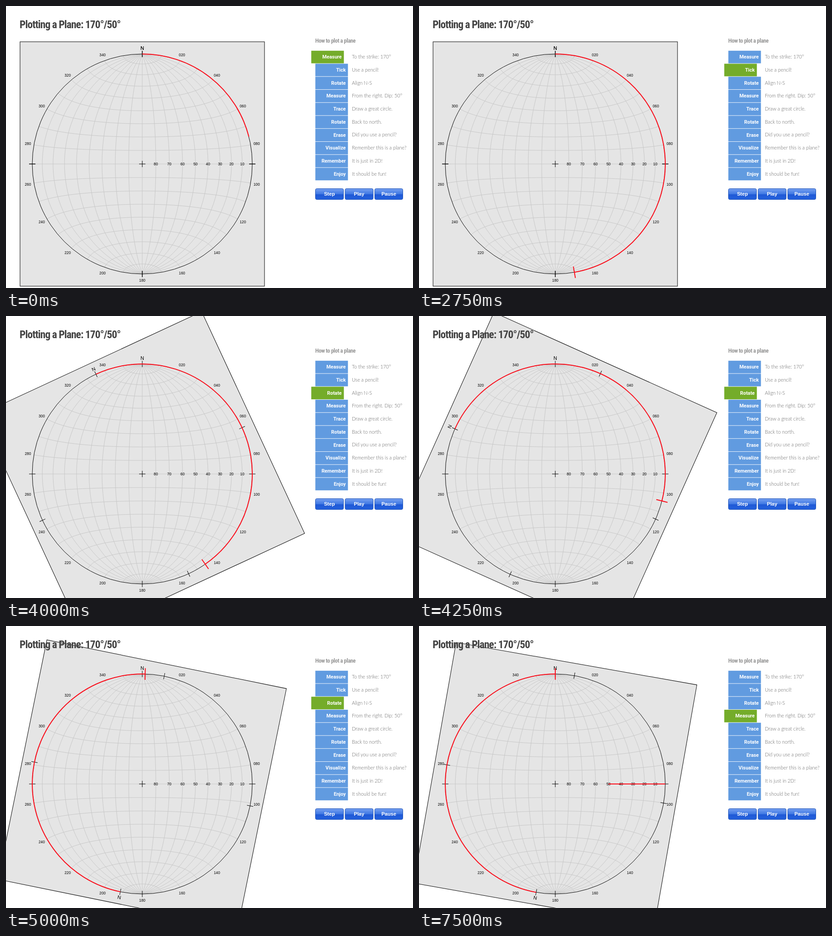
These frames come from a looping animation (899 px wide and 623 px high, 8000 ms). An HTML page:

```html
<!DOCTYPE html>
<html lang="en">
<head>
<meta charset="utf-8">
<title>Plotting a Plane</title>
<style>
  html, body { margin: 0; width: 100%; height: 100%; overflow: hidden; background: #fff; }
  svg { display: block; width: 899px; height: 623px; }
  .paper { fill: #e5e5e5; stroke: #000; }
  .grid { fill: none; stroke: #c8c8c8; }
  .line { fill: none; stroke: #000; }
  .red { fill: none; stroke: #fc0d1b; stroke-width: 2; }
  .degree { font: 8.3px "Liberation Sans", Arial, sans-serif; text-anchor: middle; }
  .north { font: 11px "Liberation Sans", Arial, sans-serif; text-anchor: middle; }
  .narrow { font-family: "Roboto Condensed", "Liberation Sans Narrow", "Open Sans Condensed", Roboto, sans-serif;
    font-stretch: 75%; font-weight: 700; letter-spacing: -.04em; }
  .label { font: 700 10.9px Roboto, sans-serif; fill: #fff; text-anchor: end; }
  .hint { font: 300 10.85px Lato, sans-serif; fill: #5e5e5e; }
  .button { fill: url(#gloss); stroke: #1c50b4; }
  .caption { font: 700 11.1px "Liberation Sans", Arial, sans-serif; fill: #fff; text-anchor: middle; }
</style>
</head>
<body>
<svg viewBox="0 0 899 623" xmlns="http://www.w3.org/2000/svg">
  <defs>
    <linearGradient id="gloss" x2="0" y2="1">
      <stop offset="0" stop-color="#759ff0"/>
      <stop offset=".5" stop-color="#3f78e3"/>
      <stop offset=".5" stop-color="#1f59d6"/>
      <stop offset="1" stop-color="#2460dc"/>
    </linearGradient>
  </defs>
</svg>
<script>
const STEP = 250, LOOP = 8000;
const CX = 301, CY = 349, SIDE = 540, R = SIDE * .45;
const MARK_OUT = R + 12.8, MARK_IN = R - 12.8;
const BLUE = [97, 155, 224], GREEN = [116, 172, 42];
const STEPS = [
  ['Measure', 'To the strike: 170°'],
  ['Tick', 'Use a pencil!'],
  ['Rotate', 'Align N-S'],
  ['Measure', 'From the right. Dip: 50°'],
  ['Trace', 'Draw a great circle.'],
  ['Rotate', 'Back to north.'],
  ['Erase', 'Did you use a pencil?'],
  ['Visualize', 'Remember this is a plane?'],
  ['Remember', 'It is just in 2D!'],
  ['Enjoy', 'It should be fun!']
];

const svg = document.querySelector('svg');
const rad = deg => deg * Math.PI / 180;
const range = (from, to, by) =>
  Array.from({ length: Math.floor((to - from) / by) + 1 }, (_, i) => from + i * by);

function add(parent, tag, attrs = {}, text = '') {
  const el = document.createElementNS(svg.namespaceURI, tag);
  for (const key in attrs) el.setAttribute(key, attrs[key]);
  el.textContent = text;
  return parent.appendChild(el);
}

// Point on the rim of a circle, bearing clockwise from north.
const bearing = (deg, r) => [r * Math.sin(rad(deg)), -r * Math.cos(rad(deg))];

// Lower-hemisphere equal-area projection, pole pointing north.
function project(theta, dip) {
  const t = rad(theta), d = rad(dip);
  const k = R / Math.sqrt(1 + Math.sin(t) * Math.sin(d));
  return [k * Math.sin(t) * Math.cos(d), -k * Math.cos(t)];
}

const trace = points => 'M' + points.map(p => p.map(v => v.toFixed(2)).join()).join('L');

function addTicks(parent) {
  for (const deg of [0, 90, 180, 270])
    add(parent, 'path', { class: 'line', d: trace([bearing(deg, R - 7), bearing(deg, R + 7)]) });
  add(parent, 'text', { class: 'north', y: -251.7 }, 'N');
}

const plot = add(svg, 'g', { transform: `translate(${CX} ${CY})` });
const paper = add(plot, 'rect', { class: 'paper', x: -SIDE / 2, y: -SIDE / 2, width: SIDE, height: SIDE });

function drawNet() {
  const fine = range(0, 180, 4);
  const curves = range(10, 170, 10).flatMap(a => [
    fine.map(t => project(t, a)),
    fine.map(d => project(a, d))
  ]);
  add(plot, 'path', { class: 'grid', d: curves.map(trace).join('') });
  add(plot, 'circle', { class: 'line', r: R });
  add(plot, 'path', { class: 'line', d: 'M-7 0H7M0-7V7' });
  addTicks(plot);
  for (const deg of range(20, 340, 20)) {
    const [x, y] = bearing(deg, 256.5);
    add(plot, 'text', { class: 'degree', x, y: y + 3 }, String(deg).padStart(3, '0'));
  }
  for (const dip of range(10, 80, 10))
    add(plot, 'text', { class: 'degree', x: project(90, dip)[0], y: 3 }, dip);
}
drawNet();

const overlay = add(plot, 'g');
addTicks(overlay);
const arc = add(overlay, 'path', { class: 'red' });
const mark = add(overlay, 'path', { class: 'red' });
const dipLine = add(plot, 'path', { class: 'red' });

// Sets a heading at the largest even size that keeps it on its line.
function heading(x, y, size, fill, room, text) {
  const el = add(svg, 'text', { class: 'narrow', x, y, fill, 'font-size': size }, text);
  const scale = Math.min(1, room / el.getComputedTextLength());
  el.setAttribute('font-size', size * scale);
}
heading(30, 49, 25, '#444', 223, 'Plotting a Plane: 170°/50°');
heading(683, 80.5, 14, '#999', 89, 'How to plot a plane');

const tabs = STEPS.map(([name, hint], i) => {
  const y = 98.8 + i * 28.73;
  const tab = add(svg, 'g');
  add(tab, 'rect', { x: 683.3, y, width: 72, height: 27.8 });
  add(tab, 'text', { class: 'label', x: 750.5, y: y + 17.5 }, name);
  add(svg, 'text', { class: 'hint', x: 764, y: y + 17.3 }, hint);
  return tab;
});

['Step', 'Play', 'Pause'].forEach((name, i) => {
  const x = 683.5 + i * 65.5;
  add(svg, 'rect', { class: 'button', x, y: 403.5, width: 62, height: 24, rx: 3 });
  add(svg, 'text', { class: 'caption', x: x + 31, y: 419.3 }, name);
});

// Eased poses, one per step; each holds its last value.
const pose = (tick, start, before, values) =>
  tick < start ? before : values[Math.min(tick - start, values.length - 1)];

function entered(tick, i) {
  if (i === 0) return 1;
  if (i > 3) return 0;
  return pose(tick, i * 9 - 3, 0, [i === 1 ? .61 : .5, 1]);
}

function draw(tick) {
  const sweep = pose(tick, 0, 0, [75.6, 122.8, 157.8, 168.8, 170]);
  const inner = pose(tick, 6, MARK_OUT, [254.7, 252, 245.3, 237, 231, MARK_IN]);
  const turn = pose(tick, 15, 0, [3.4, 24.9, 65.8, 113.4, 150.9, 168.5, 170]);
  const reach = pose(tick, 24, R, [239, 222, 190, 155, 129, project(90, 50)[0]]);

  arc.setAttribute('d', `M0 ${-R}A${R} ${R} 0 0 1 ${bearing(sweep, R)}`);
  mark.setAttribute('d', inner < MARK_OUT ? trace([bearing(170, MARK_OUT), bearing(170, inner)]) : '');
  dipLine.setAttribute('d', reach < R ? `M${R} 0H${reach}` : '');
  for (const el of [paper, overlay]) el.setAttribute('transform', `rotate(${-turn})`);

  tabs.forEach((tab, i) => {
    const on = entered(tick, i) - entered(tick, i + 1);
    const color = BLUE.map((c, n) => Math.round(c + (GREEN[n] - c) * on));
    tab.setAttribute('transform', `translate(${-9 * on})`);
    tab.firstChild.setAttribute('fill', `rgb(${color})`);
  });
}

const began = performance.now();
function frame() {
  draw(Math.floor((performance.now() - began) % LOOP / STEP));
  requestAnimationFrame(frame);
}
frame();
</script>
</body>
</html>
```
